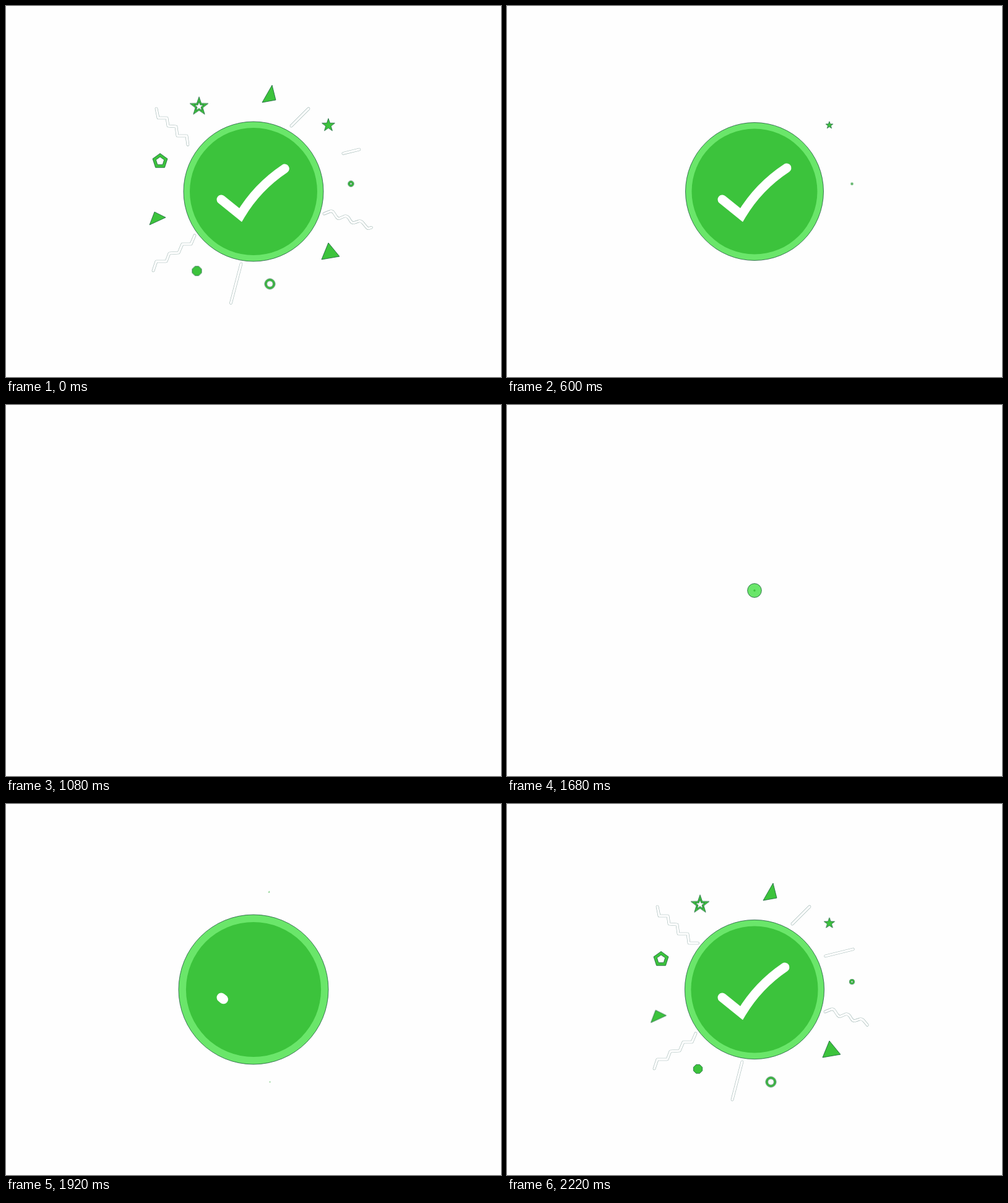
An HTML page without scripts for the animation above (2250 ms loop, 800x600 px).

```html
<!DOCTYPE html>
<html lang="en">
<head>
<meta charset="utf-8">
<title>Success check</title>
<style>
  html, body { margin: 0; width: 100%; height: 100%; overflow: hidden; background: #fefefe; }
  svg { display: block; width: 100vw; height: 100vh; }

  /* badge */
  .disc { stroke-width: .8; }
  .outer { fill: #6ae66a; stroke: #1c5a3c; animation: outer 2250ms infinite; }
  .inner { fill: #3cc33c; animation: inner 2250ms infinite; }
  .tick {
    fill: none; stroke: #fff; stroke-width: 15; stroke-linecap: round;
    stroke-dasharray: 100 102; animation: tick 2250ms linear infinite;
  }
  @keyframes outer {
    0% { r: 113px; animation-timing-function: ease-in-out; }
    5.3% { r: 111.5px; }
    41% { r: 111.5px; animation-timing-function: ease-in; }
    47.8%, 74% { r: 0; animation-timing-function: linear; }
    80% { r: 95.5px; animation-timing-function: ease-out; }
    84% { r: 122px; animation-timing-function: ease-in-out; }
    92% { r: 105.5px; animation-timing-function: ease-in-out; }
    100% { r: 113px; }
  }
  @keyframes inner {
    0% { r: 103px; animation-timing-function: ease-in-out; }
    5.3% { r: 101.5px; }
    41% { r: 101.5px; animation-timing-function: ease-in; }
    47.5%, 74.6% { r: 0; animation-timing-function: linear; }
    80% { r: 81.5px; animation-timing-function: ease-out; }
    84% { r: 110px; animation-timing-function: ease-in-out; }
    92% { r: 95px; animation-timing-function: ease-in-out; }
    100% { r: 103px; }
  }
  @keyframes tick {
    0% { stroke-dashoffset: 1.4; }
    2%, 34% { stroke-dashoffset: 0; }
    40% { stroke-dashoffset: -49; }
    45%, 85% { stroke-dashoffset: -101; }
    92% { stroke-dashoffset: -177; }
    98.67% { stroke-dashoffset: -199.5; }
    100% { stroke-dashoffset: -200.6; }
  }

  /* confetti: --in and --out are start times within the loop */
  .bit {
    fill: #3cc33c; stroke: #17603a; stroke-width: .8;
    animation: grow 2250ms calc(var(--in) - 2925ms) infinite,
               drop 2250ms calc(var(--out) - 2250ms) infinite;
  }
  .hole { fill: #fefefe; }
  @keyframes grow {
    0%, 30% { scale: 0; animation-timing-function: ease-out; }
    38%, 100% { scale: 1; }
  }
  @keyframes drop {
    0% { transform: scale(1); animation-timing-function: ease-in; }
    8%, 60% { transform: scale(0); animation-timing-function: step-end; }
    60.1%, 100% { transform: scale(1); }
  }

  /* streamers: the dash slides along and wraps after one period */
  .line {
    fill: none; stroke: #a3b9b6; stroke-width: 4.6; stroke-linecap: round; stroke-linejoin: round;
    stroke-dasharray: 100 110; animation: 2250ms linear infinite;
  }
  .core { stroke: #fefefe; stroke-width: 3.4; }
  .zig-top { animation-name: zig-top; }
  .zig-low { animation-name: zig-low; }
  .wave { animation-name: wave; }
  .ray-top { animation-name: ray-top; }
  .ray-low { animation-name: ray-low; }
  .ray-side { stroke-dasharray: 46 80; animation-name: ray-side; }
  @keyframes zig-top {
    0% { stroke-dashoffset: -13; }
    8%, 85.3% { stroke-dashoffset: -105; }
    92% { stroke-dashoffset: -183; }
    96.4%, 98.67% { stroke-dashoffset: -210; }
    100% { stroke-dashoffset: -223; }
  }
  @keyframes zig-low {
    0%, 1.33% { stroke-dashoffset: 0; }
    12%, 88% { stroke-dashoffset: -105; }
    92% { stroke-dashoffset: -153; }
    97.8%, 100% { stroke-dashoffset: -210; }
  }
  @keyframes wave {
    0% { stroke-dashoffset: 8; }
    1.5%, 4% { stroke-dashoffset: 0; }
    13%, 92.3% { stroke-dashoffset: -105; }
    97.33% { stroke-dashoffset: -183; }
    98.67% { stroke-dashoffset: -193; }
    100% { stroke-dashoffset: -202; }
  }
  @keyframes ray-top {
    0%, 1% { stroke-dashoffset: 0; }
    9%, 85.3% { stroke-dashoffset: -105; }
    92% { stroke-dashoffset: -183; }
    96.4%, 100% { stroke-dashoffset: -210; }
  }
  @keyframes ray-low {
    0% { stroke-dashoffset: 2.5; }
    1.33%, 4% { stroke-dashoffset: 0; }
    13%, 92.3% { stroke-dashoffset: -105; }
    97.33% { stroke-dashoffset: -198; }
    98.67% { stroke-dashoffset: -204; }
    100% { stroke-dashoffset: -207.5; }
  }
  @keyframes ray-side {
    0% { stroke-dashoffset: -39; }
    1.5%, 86% { stroke-dashoffset: -73; }
    92% { stroke-dashoffset: -126; }
    98.67% { stroke-dashoffset: -134; }
    100% { stroke-dashoffset: -165; }
  }
</style>
</head>
<body>
<svg viewBox="0 0 800 600">
  <defs>
    <path id="star" vector-effect="non-scaling-stroke" d="M0-10 2.35-3.24 9.51-3.09 3.8 1.24 5.88 8.09 0 4-5.88 8.09-3.8 1.24-9.51-3.09-2.35-3.24Z"/>
    <path id="penta" vector-effect="non-scaling-stroke" d="M0-10 9.51-3.09 5.88 8.09-5.88 8.09-9.51-3.09Z"/>
  </defs>

  <g class="line zig-top">
    <path id="zt" pathLength="100" d="M309 225H294L292 210H277L275 195 262 194 260 181H246L243 166"/>
    <use href="#zt" class="core"/>
  </g>
  <g class="line zig-low">
    <path id="zl" pathLength="100" d="M305 371 299 385H285L279 399 264 400 259 413H243L238 428"/>
    <use href="#zl" class="core"/>
  </g>
  <g class="line wave">
    <path id="wv" pathLength="100" d="M514 336 524 332Q528 331 530 335L534 341Q537 345 540 343L547 340Q551 339 554 343L557 348Q560 352 564 350L570 348Q574 347 577 351L582 357Q585 361 588 359L598 356"/>
    <use href="#wv" class="core"/>
  </g>
  <g class="line ray-top">
    <path id="rt" pathLength="100" d="M461 194 489 166"/>
    <use href="#rt" class="core"/>
  </g>
  <g class="line ray-low">
    <path id="rl" pathLength="100" d="M380 417 363 482"/>
    <use href="#rl" class="core"/>
  </g>
  <g class="line ray-side">
    <path id="rs" d="M506 248 571 232"/>
    <use href="#rs" class="core"/>
  </g>

  <g transform="translate(312 162.5)"><g class="bit" style="--in:1976ms;--out:360ms">
    <use href="#star" transform="scale(1.55)"/>
    <use href="#star" class="hole" transform="scale(.8)"/>
  </g></g>
  <g transform="translate(521 192.8)"><g class="bit" style="--in:2126ms;--out:480ms">
    <use href="#star" transform="scale(1.26)"/>
  </g></g>
  <g transform="translate(249 251)"><g class="bit" style="--in:1976ms;--out:400ms">
    <use href="#penta" transform="scale(1.26)"/>
    <use href="#penta" class="hole" transform="scale(.7)"/>
  </g></g>
  <g transform="translate(425 142)"><g class="bit" style="--in:1910ms;--out:320ms">
    <path d="M5-14 11 10-11 14Z"/>
  </g></g>
  <g transform="translate(245 343)"><g class="bit" style="--in:2071ms;--out:418ms">
    <path d="M-5-10 13-1-13 11Z"/>
  </g></g>
  <g transform="translate(524 397)"><g class="bit" style="--in:1976ms;--out:365ms">
    <path d="M-3-14 15 8-14 13Z"/>
  </g></g>
  <g transform="translate(308.5 428.5)"><g class="bit" style="--in:2071ms;--out:415ms">
    <path d="M-3-7.5H3L7.5-3V3L3 7.5H-3L-7.5 3V-3Z"/>
  </g></g>
  <g transform="translate(426.5 449.5)"><g class="bit" style="--in:1910ms;--out:312ms">
    <circle r="8.3"/><circle class="hole" r="5.2"/>
  </g></g>
  <g transform="translate(557.5 287.5)"><g class="bit" style="--in:2095ms;--out:470ms">
    <circle r="4.6"/><circle class="hole" r="1.8"/>
  </g></g>

  <circle class="disc outer" cx="400" cy="300"/>
  <circle class="disc inner" cx="400" cy="300"/>
  <path class="tick" pathLength="100" d="M348 313 379 338Q406.5 292 452 262"/>
</svg>
</body>
</html>
```
